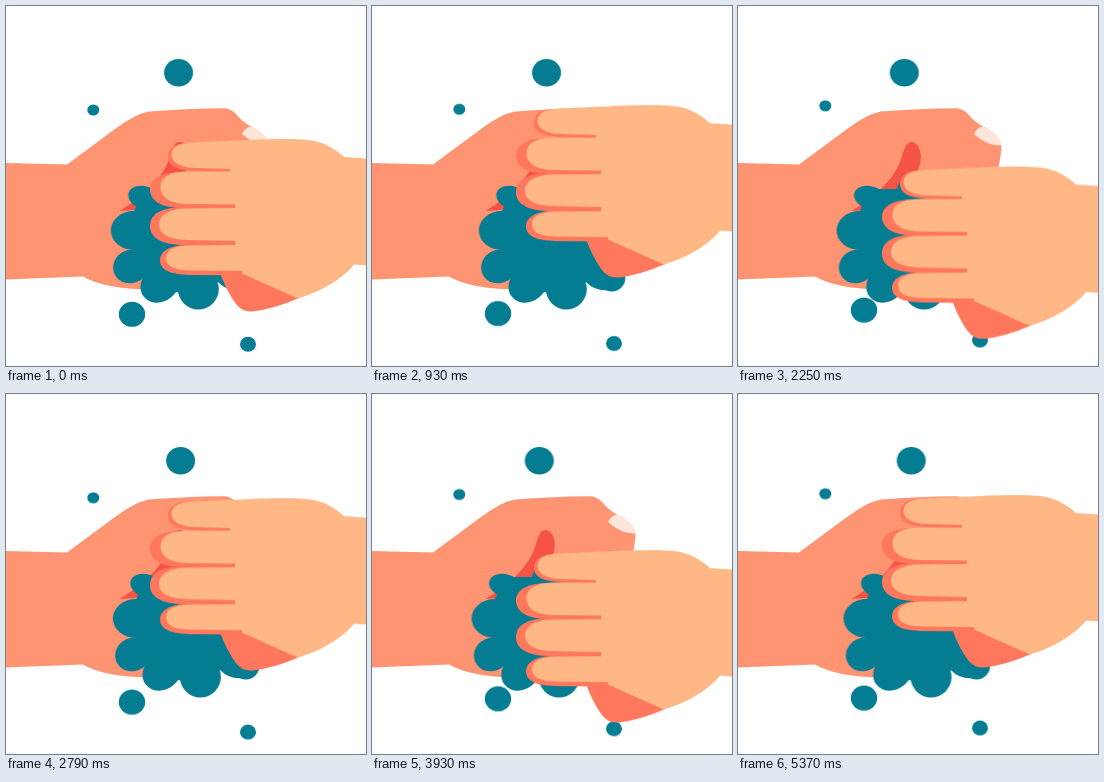
Animation, 360 px wide and 360 px high, one loop 5400 ms. Source, as an HTML page:

```html
<!DOCTYPE html>
<html lang="en">
<head>
<meta charset="utf-8">
<title>Washing hands</title>
<style>
  html, body { margin: 0; width: 100%; height: 100%; overflow: hidden; background: #fff; }
  svg { display: block; width: 100vw; height: 100vh; }

  .skin { fill: #ff9472; }
  .crease { fill: #f55346; }
  .nail { fill: #fde5da; }
  .soap { fill: #047c91; }
  .shade { fill: #ff775c; }
  .light { fill: #ffb785; }

  .rub, .slide, .bob {
    animation: 1800ms cubic-bezier(.37, 0, .63, 1) infinite;
  }
  .rub { animation-name: rub; }
  .slide { animation-name: slide; }
  .bob { animation-name: bob; }

  /* the front hand scrubs up and down */
  @keyframes rub {
    0% { transform: translateY(0); }
    25% { transform: translateY(27.5px); }
    50.5% { transform: translateY(-34.3px); }
    74% { transform: translateY(27.5px); }
    100% { transform: translateY(-32.5px); }
  }
  /* the foam is pushed sideways */
  @keyframes slide {
    0% { transform: translateX(-2.2px); }
    25% { transform: translateX(-8.4px); }
    52% { transform: translateX(-.2px); }
    76% { transform: translateX(.7px); }
    100% { transform: translateX(-1.5px); }
  }
  /* the loose bubbles float */
  @keyframes bob {
    0% { transform: translateY(0); }
    25% { transform: translateY(-4.2px); }
    70% { transform: translateY(1.1px); }
    100% { transform: translateY(-4.3px); }
  }
</style>
</head>
<body>
<svg viewBox="0 0 360 360">
  <!-- back hand -->
  <path class="skin" d="M0 157L61 158.500L109 123Q129 108 143 105.500Q181 102.500 217 102.300Q225 102.300 230 108Q237 116.500 245 120.500Q258 127 262 135Q264 139 263.500 144L260 165L225 260L145 283.500Q98 283 77 270.500L0 273.500Z"/>
  <path class="nail" d="M236 128Q239 121.500 245 120.500Q260 127 264 139.500Q249 140 236 128Z"/>
  <path class="crease" d="M113.500 205C137 191 158 172 164 150C167 138 171 134.500 176 136.500C183 140 185 152 180 164C172 184 152 203 128 204Z"/>

  <!-- loose bubbles -->
  <g class="soap bob">
    <ellipse cx="87.300" cy="104" rx="6" ry="5.600"/>
    <ellipse cx="126" cy="308.300" rx="13.200" ry="12.500"/>
    <ellipse cx="242" cy="338.200" rx="8" ry="7.500"/>
  </g>

  <!-- foam -->
  <g class="soap slide">
    <ellipse cx="174.700" cy="66.700" rx="14.500" ry="13.700"/>
    <ellipse cx="141" cy="192" rx="17" ry="11.500" transform="rotate(18 141 192)"/>
    <circle cx="186" cy="188" r="19.500"/>
    <ellipse cx="130" cy="224.500" rx="23" ry="19.500"/>
    <ellipse cx="127" cy="260.500" rx="18" ry="16.500" transform="rotate(-25 127 260.500)"/>
    <ellipse cx="156" cy="278" rx="20.500" ry="17.500" transform="rotate(-38 156 278)"/>
    <circle cx="194.500" cy="283" r="20.500"/>
    <circle cx="240" cy="272" r="13.500"/>
    <path d="M140 183L190 183L240 260L238 284Q224 286 214 276L196 290L160 284L130 262L130 206Z"/>
  </g>

  <!-- front hand -->
  <g class="rub">
    <path class="shade" d="M226 136L182 137C168 137 162 143 162 151C162 160 172 164.500 188 165L224 165.500Z"/>
    <path class="shade" d="M230 164L172 166C153 167 144 174 144 183C144 195 155 202 178 202L230 202Z"/>
    <path class="shade" d="M230 200L170 201.500C152 203 144 210 144 220C144 232 156 238.500 176 239L230 239.500Z"/>
    <path class="shade" d="M236 238L178 239C162 240 154 246 154 254C154 264 164 268.500 184 269L238 269.500Z"/>
    <path class="shade" d="M214 267L240 264L293 292Q268 303 246 305.500Q236 306 230 298Q221 286 214 267Z"/>

    <path class="light" d="M230 134.500L186 136.500C172 137 165.500 142 165.500 149C165.500 157 175 161.500 190 162L224 163V140Z"/>
    <path class="light" d="M230 165.500L180 165.500C163 166 154.500 172 154.500 181C154.500 192 165 198 184 198L229 198.500Z"/>
    <path class="light" d="M230 202L177 202.500C161 204 153 210 153 218C153 228 162 233.500 182 234L229 235Z"/>
    <path class="light" d="M236 239L182 239.500C167 240 160 245 160 252C160 260.500 169 264.500 186 264.500L236 265Z"/>
    <path class="light" d="M224 135C255 132.500 296 132 309 135Q325 139 338 151L361 152.500V259.500L348 258.500C339 270 320 284 292 292.500L236 267.500V264L229 240V166H224Z"/>
  </g>
</svg>
</body>
</html>
```
